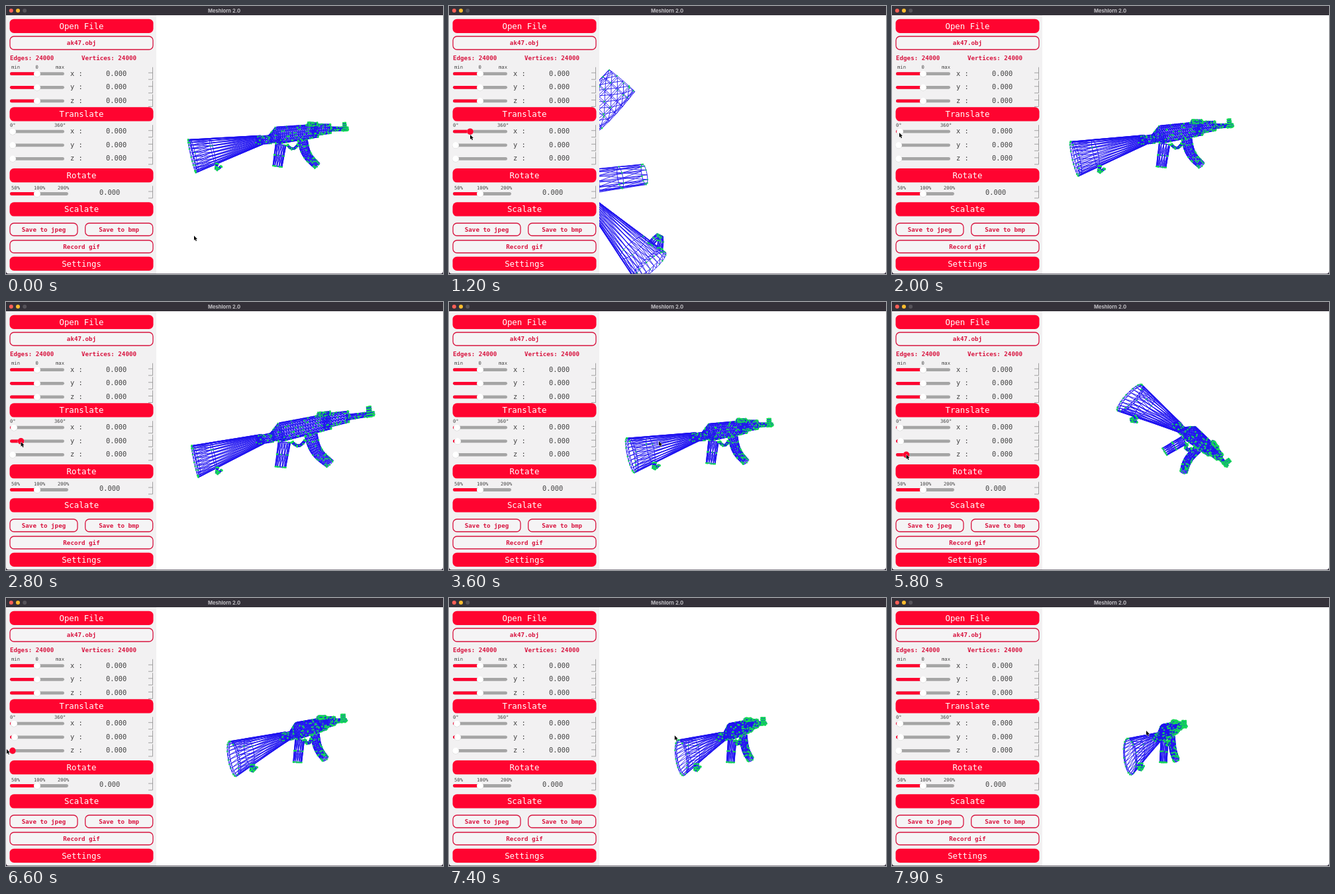
Animation of 660 by 406 pixels, one loop 8000 ms. Source, as an HTML page with a canvas:

```html
<!DOCTYPE html>
<html lang="en">
<head>
<meta charset="utf-8">
<title>Meshlorn 2.0</title>
<style>
html, body { margin: 0; width: 660px; height: 406px; overflow: hidden; background: #fff; }
canvas { display: block; }
</style>
</head>
<body>
<canvas id="stage" width="660" height="406"></canvas>
<script>
const ctx = document.getElementById('stage').getContext('2d');
const LOOP = 8000, RED = '#ff0430', DEEP = '#d8143f', GREY = '#444';
const BLUE = '#1f12f0', GREEN = '#14dc55';
const MONO = '"DejaVu Sans Mono", "Noto Sans Mono", monospace';

const mix = (a, b, k) => a + (b - a) * k;
const hash = n => { const s = Math.sin(n * 127.1 + 11.7) * 43758.5453; return s - Math.floor(s); };

// Each move eases all values from where they are: [start, end, ...values].
function track(first, moves, t) {
  return moves.reduce((now, [start, end, ...next]) => {
    const k = Math.min(1, Math.max(0, (t - start) / (end - start)));
    return now.map((v, i) => mix(v, next[i], k * k * (3 - 2 * k)));
  }, first);
}

const drags = {
  x: { moves: [[550, 1200, 32], [1200, 2000, 12]], down: [550, 1900] },
  y: { moves: [[2350, 2700, 24], [2700, 3150, 13]], down: [2350, 3150] },
  z: { moves: [[5400, 5850, 22], [5850, 6500, 10]], down: [5000, 6800] }
};
const knobAt = (axis, t) => track([10], drags[axis].moves, t)[0];
const nearAt = t => track([0], [[550, 1200, 1], [1200, 2000, 0]], t)[0];

const cursorAt = t => track([284, 348], [
  [100, 550, 10, 191], [550, 1200, 32, 195], [1200, 1950, 11, 191], [1950, 2350, 11, 211],
  [2350, 2700, 24, 212], [2700, 3150, 13, 212], [3150, 3600, 317, 211], [3600, 4050, 390, 205],
  [4050, 4600, 45, 195], [4600, 5000, 10, 231], [5400, 5850, 22, 231], [5850, 6500, 1, 229],
  [6800, 7200, 330, 210], [7200, 7900, 384, 201]
], t);

// Pivot x and y, length, tilt, perspective, zoom.
const poseAt = t => track([444, 215, 1, 0, 0, 1], [
  [550, 2000, 441, 213.5, .965, -.029, 0, 1.05],
  [2350, 2700, 460, 215, 1.1, -.1, -.0015, 1.2],
  [2700, 3150, 425.3, 215.6, .88, -.022, .0003, 1],
  [3700, 4400, 455.5, 217, .685, -.06, .00045, 1],
  [5400, 6500, 464, 218, .69, -.07, .00045, 1],
  [6900, 7900, 421, 220.9, .343, -.032, .001, .93]
], t);

// Tapered tubes: x, y and width at root and tip; near is tip x, y, scale, turn in the close view.
const tubes = [
  { root: [386, 203, 14], tip: [281, 227.5, 52], rings: 3, skew: 3, dots: .12, near: [304, 394, 1.2, -120] },
  { root: [378, 204, 12], tip: [400, 202, 13], dots: .2 },
  { root: [398, 202, 11], tip: [412, 195.5, 26], dots: .2 },
  { root: [410, 196, 26], tip: [470, 189, 20], dots: .16 },
  { root: [462, 188, 19], tip: [490, 186, 14], dots: .22 },
  { root: [488, 186.5, 7], tip: [516, 186, 5], dots: .35 },
  { root: [512, 189, 5], tip: [511, 177, 4], dots: .8 },
  { root: [456, 179, 6], tip: [470, 179, 5], dots: .5 },
  { root: [415, 210, 16], tip: [410, 243, 14], rings: 2, dots: .3, near: [295, 255, 2.2, -106] },
  { root: [448, 204, 15], tip: [470, 242, 11], bend: 4.8, dots: .2, near: [261, 113, 4.6, -90] },
  { root: [319, 239, 3], tip: [325, 243, 3], bend: 8, rings: 5, dots: .7, near: [304, 361, 2.2, -190] },
  { root: [425, 211, 3], tip: [441, 210, 3], bend: 6, rings: 5, dots: .4 }
];

// Point on a tube: t along it, v from -.5 to .5 across.
function tubePoint({ root, tip, bend = 0 }, t, v) {
  const dx = tip[0] - root[0], dy = tip[1] - root[1], len = Math.hypot(dx, dy);
  const ux = dx / len, uy = dy / len;
  const lift = bend * Math.sin(Math.PI * t);
  const lean = Math.atan(bend * Math.PI * Math.cos(Math.PI * t) / len) + Math.atan2(uy, ux);
  const across = v * mix(root[2], tip[2], t);
  return [
    mix(root[0], tip[0], t) - uy * lift - Math.sin(lean) * across,
    mix(root[1], tip[1], t) + ux * lift + Math.cos(lean) * across
  ];
}

function drawTube(tube, id, pose, near) {
  const { root, tip, skew = 1, dots, near: [cx, cy, scale, turn] = [110, 190, 2, -90] } = tube;
  const [px, py, length, tilt, persp, zoom] = pose;
  const rings = tube.rings || Math.max(2, Math.round(Math.hypot(tip[0] - root[0], tip[1] - root[1]) / 3));
  const wide = Math.max(root[2], tip[2]), sides = Math.round(8 + wide / 3);
  const thick = 1 + Math.sqrt(wide) * .7;
  const depth = .3 + 1.1 * Math.sqrt(Math.max(0, 1 - length * length));
  const c = Math.cos(turn * Math.PI / 180) * scale, s = Math.sin(turn * Math.PI / 180) * scale;
  const pull = near * .4, total = 1 - near + pull;

  const grid = Array.from({ length: rings + 1 }, (_, i) => {
    const t = 1 - Math.pow(1 - i / rings, skew);
    return Array.from({ length: sides }, (_, j) => {
      const a = j / sides * Math.PI * 2, side = Math.sin(a) * thick;
      const [mx, my] = tubePoint(tube, t, -Math.cos(a) / 2);
      const x = mx - 444, y = my - 215, f = zoom / (1 + x * persp);
      const far = [px + (x * length + side * depth) * f, py + (y + x * tilt) * f];
      const rx = mx - tip[0], ry = my - tip[1];
      const close = [cx + rx * c - ry * s + side * 1.2, cy + rx * s + ry * c + side * .7];
      return far.map((p, n) => (p * (1 - near) + close[n] * pull) / total);
    });
  });

  ctx.beginPath();
  grid.forEach((ring, i) => ring.forEach((p, j) => {
    const join = q => { ctx.moveTo(...p); ctx.lineTo(...q); };
    join(ring[(j + 1) % sides]);
    if (i < rings) {
      join(grid[i + 1][j]);
      join(grid[i + 1][(j + 1) % sides]);
    }
  }));
  ctx.stroke();

  grid.forEach((ring, i) => ring.forEach(([x, y], j) => {
    const seed = id * 911 + i * 37 + j;
    if (hash(seed) > (i === rings ? .6 : dots)) return;
    const size = 1.5 + hash(seed + .5);
    ctx.fillRect(x - size / 2, y - size / 2, size, size);
  }));
}

function drawModel(t) {
  const pose = poseAt(t), near = nearAt(t);
  ctx.save();
  ctx.translate(444, 215);
  ctx.rotate((knobAt('z', t) - 10) / 78 * Math.PI * 2);
  ctx.translate(-444, -215);
  ctx.strokeStyle = BLUE;
  ctx.fillStyle = GREEN;
  ctx.lineWidth = .9;
  tubes.forEach((tube, i) => drawTube(tube, i, pose, near));
  ctx.restore();
}

function text(str, x, y, size, color, align = 'left', weight = 400, family = MONO) {
  ctx.font = `${weight} ${size}px ${family}`;
  ctx.textAlign = align;
  ctx.fillStyle = color;
  ctx.fillText(str, x, y);
}

function box(x, y, w, h, r, fill, stroke) {
  ctx.beginPath();
  ctx.roundRect(x, y, w, h, r);
  ctx.fillStyle = fill;
  ctx.fill();
  if (stroke) { ctx.strokeStyle = stroke; ctx.lineWidth = 1.3; ctx.stroke(); }
}

function disc(x, y, r, color) {
  ctx.beginPath();
  ctx.arc(x, y, r, 0, Math.PI * 2);
  ctx.fillStyle = color;
  ctx.fill();
}

function solidButton(label, y) {
  box(5.5, y, 217, 21.3, 6.5, RED);
  text(label, 114, y + 15, 12.4, '#fff', 'center');
}

function lineButton(label, x, y, w, h) {
  box(x, y, w, h, 6, '#f5f4f5', DEEP);
  text(label, x + w / 2, y + h / 2 + 3.2, 9.2, DEEP, 'center', 700);
}

function slider(y, end, knob, down) {
  box(6, y - 2.4, end - 6, 4.8, 2.4, '#a5a5a5');
  if (knob > 10) box(6, y - 2.4, knob - 6, 4.8, 2.4, RED);
  disc(knob, y + .4, 5, '#d9d9d9');
  disc(knob, y, 4.8, down ? RED : '#fff');
}

function spinner(y) {
  ctx.beginPath();
  ctx.moveTo(221.5, y - 10);
  ctx.lineTo(221.5, y + 8.5);
  ctx.lineTo(215, y + 8.5);
  ctx.moveTo(215, y - 1.5);
  ctx.lineTo(221.5, y - 1.5);
  ctx.strokeStyle = '#8d8d8d';
  ctx.lineWidth = .8;
  ctx.stroke();
}

function axisRows(top, state) {
  ['x', 'y', 'z'].forEach((axis, i) => {
    const y = top + i * 20.6;
    slider(y, 88, ...state(axis));
    text(axis + ' :', 97, y + 3, 10.4, GREY);
    text('0.000', 151, y + 3, 10.4, GREY);
    spinner(y);
  });
}

const marks = (y, list) => list.forEach(([str, x]) => text(str, x, y, 7.2, GREY));

function drawPanel(t) {
  ctx.fillStyle = '#f2f1f2';
  ctx.fillRect(0, 14, 227, 392);
  solidButton('Open File', 19.7);
  lineButton('ak47.obj', 6, 46, 216, 20);
  text('Edges: 24000', 6, 82.3, 9.2, DEEP, 'left', 700);
  text('Vertices: 24000', 114, 82.3, 9.2, DEEP, 'left', 700);

  marks(95, [['min', 8], ['0', 44.5], ['max', 75]]);
  axisRows(102.7, () => [47, false]);
  solidButton('Translate', 153.3);

  marks(183, [['0°', 6], ['360°', 73]]);
  axisRows(190.2, axis => {
    const [from, to] = drags[axis].down;
    return [knobAt(axis, t), t >= from && t < to];
  });
  solidButton('Rotate', 246);

  marks(278, [['50%', 8], ['100%', 42], ['200%', 78]]);
  slider(284.5, 94, 47, false);
  text('0.000', 141, 286.3, 10.4, GREY);
  spinner(282.5);
  solidButton('Scalate', 297.3);

  lineButton('Save to jpeg', 6, 329, 102, 19);
  lineButton('Save to bmp', 119.7, 329, 102, 19);
  lineButton('Record gif', 6, 355, 216, 19);
  solidButton('Settings', 379.7);
}

function drawFrame() {
  ctx.fillStyle = '#343139';
  ctx.fillRect(0, 0, 660, 14);
  ['#ff5f57', '#febc2e', '#56535a'].forEach((c, i) => disc(7.8 + i * 10.2, 7, 3, c));
  text('Meshlorn 2.0', 329.5, 9.6, 7.6, '#c2c0c5', 'center', 700, 'Inter, Roboto, sans-serif');
  // Dark desktop behind the rounded window corners.
  ctx.beginPath();
  ctx.rect(0, 0, 660, 406);
  ctx.roundRect(0, 0, 660, 405.5, 4);
  ctx.fillStyle = '#2a2233';
  ctx.fill('evenodd');
}

function drawCursor(x, y) {
  ctx.save();
  ctx.translate(x, y);
  ctx.beginPath();
  [[0, 0], [0, 7], [1.6, 5.6], [2.8, 8.3], [4, 7.8], [2.9, 5.2], [4.9, 5]]
    .forEach(p => ctx.lineTo(...p));
  ctx.closePath();
  ctx.strokeStyle = '#fff';
  ctx.lineWidth = 1;
  ctx.stroke();
  ctx.fillStyle = '#000';
  ctx.fill();
  ctx.restore();
}

const start = performance.now();
function draw() {
  const t = (performance.now() - start) % LOOP;
  ctx.fillStyle = '#fff';
  ctx.fillRect(0, 0, 660, 406);
  drawModel(t);
  drawPanel(t);
  drawFrame();
  drawCursor(...cursorAt(t));
  requestAnimationFrame(draw);
}
draw();
</script>
</body>
</html>
```
